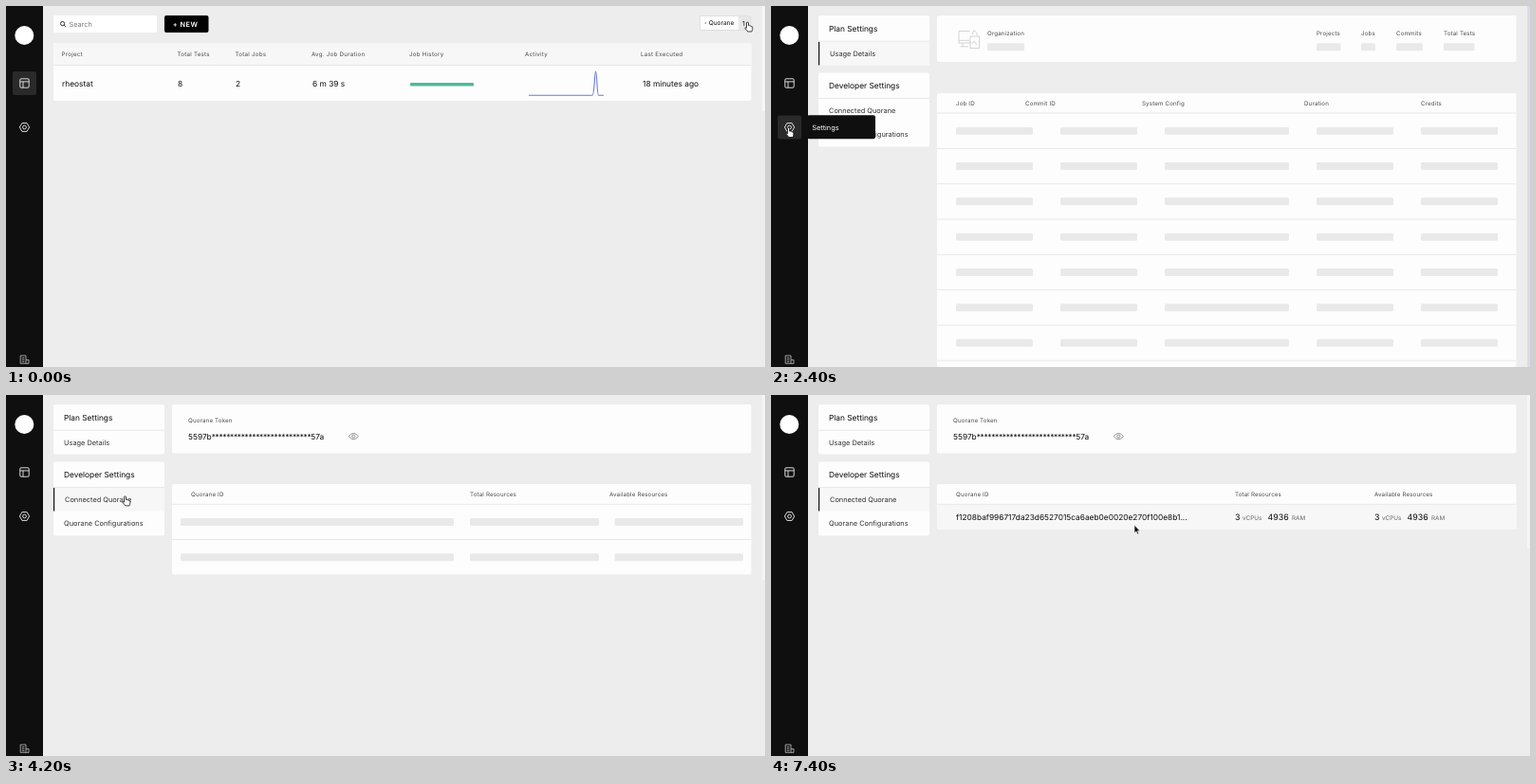
An HTML page that plays this animation: 800x381 px, repeating every 8000 ms.

```html
<!DOCTYPE html>
<html lang="en">
<head>
<meta charset="utf-8">
<title>Project dashboard</title>
<style>
html, body { margin: 0; width: 100%; height: 100%; overflow: hidden; background: #ededed; }
svg { display: block; width: 100vw; height: 100vh; }
text {
  font-family: Inter, "Liberation Sans", sans-serif; font-feature-settings: "calt" 0;
  text-rendering: geometricPrecision; white-space: pre;
}
</style>
</head>
<body>
<svg id="stage" viewBox="0 0 800 381" xmlns="http://www.w3.org/2000/svg"></svg>
<script>
const LOOP = 8000, TICK = 200;
const INK = '#0c0c0c', SOFT = '#4a4a4a', LINE = '#e8e8e8', BAR = '#e9e9e9', CARD = '#fdfdfd';
const WIDE = 610.5;

// Drawing helpers; text is placed by its vertical centre
const rect = (x, y, w, h, fill, r = 0, more = '') =>
  `<rect x="${x}" y="${y}" width="${w}" height="${h}" fill="${fill}" rx="${r}" ${more}/>`;
const path = (d, stroke, width = 1, fill = 'none') =>
  `<path d="${d}" stroke="${stroke}" stroke-width="${width}" fill="${fill}" stroke-linejoin="round"/>`;
const text = (x, cy, str, size, fill = INK, weight = 400, gap = 0) =>
  `<text x="${x}" y="${(cy + size * 0.36).toFixed(2)}" font-size="${size}" fill="${fill}" font-weight="${weight}" letter-spacing="${gap}">${str}</text>`;
const label = (x, cy, str, gap = 0.15) => text(x, cy, str, 6.2, SOFT, 400, gap);
const value = (x, cy, str) => text(x, cy, str, 8.33);
const bar = (x, cy, w, h = 8) => rect(x, cy - h / 2, w, h, BAR, 1.5);
const rule = (x, y, w) => rect(x, y - 0.5, w, 1, LINE);
const each = (list, fn) => list.map(fn).join('');
const group = (id, body) => `<g id="${id}">${body}</g>`;

function sidebar() {
  return rect(0, 0, 39, 381, '#0f0f0f') +
    '<circle cx="19.3" cy="31" r="10" fill="#fff"/>' +
    group('dashOn', rect(7, 69, 25, 25, '#2a2a2a', 2)) +
    path('M16 76.8H23Q24.2 76.8 24.2 78V85Q24.2 86.2 23 86.2H16Q14.8 86.2 14.8 85V78Q14.8 76.8 16 76.8ZM14.8 79.9H24.2M18 79.9V86.2', '#e2e2e2', 0.95) +
    group('gearOn', rect(7, 115.5, 25, 25, '#2a2a2a', 2)) +
    path('M14.4 128L16.9 123.6H22.1L24.6 128L22.1 132.4H16.9Z', '#ddd') +
    '<circle cx="19.5" cy="128" r="1.9" fill="none" stroke="#ddd"/>' +
    path('M15.2 377.3V369H21V373.6H24V377.3ZM21 373.6V377.3M16.8 371.4H19.4M16.8 373.4H19.4M16.8 375.4H19.4', '#c4c4c4', 0.8);
}

function projects() {
  const heads = [[58.5, 'Project'], [180.5, 'Total Tests'], [241.5, 'Total Jobs'],
    [322, 'Avg. Job Duration'], [425, 'Job History'], [547, 'Activity'], [669, 'Last Executed']];
  const cells = [[59, 'rheostat'], [181, '8'], [242, '2'], [323, '6 m 39 s'], [671, '18 minutes ago']];
  return rect(797, 0, 3, 111, '#f6f6f6') +
    rect(50, 10, 109, 18, '#fff', 2) +
    '<circle cx="59.6" cy="18.6" r="2.1" fill="none" stroke="#222" stroke-width=".9"/>' +
    path('M61.2 20.2L62.8 21.8', '#222') + text(66.5, 19, 'Search', 7.3, '#777') +
    rect(167, 10, 46.5, 18, '#000', 2) + text(175.8, 19, '+ NEW', 7.3, '#fff', 600, 0.5) +
    rect(731.5, 10.5, 53.5, 15, '#e8e8e8', 1.5, 'stroke="#dcdcdc" stroke-width=".7"') +
    rect(732, 11, 40, 14, '#fff', 1) +
    '<circle cx="737.3" cy="18" r=".8" fill="#777"/>' +
    text(740.8, 18, 'Quorane', 6.5) + text(776, 18, '1', 7) +
    rect(50, 39, 735.5, 61, CARD, 2) + rect(50, 39, 735.5, 24, '#f7f7f7', 2) + rule(50, 62.5, 735.5) +
    each(heads, ([x, s]) => label(x, 50.5, s, 0.25)) +
    each(cells, ([x, s]) => value(x, 81.5, s)) +
    rect(426, 81, 67, 3.6, '#52b89b', 1.2) +
    path('M551 94.3H618C620.3 94.3 620.3 69 621.6 69S622.8 94.3 624.6 94.3H630', '#6c78dc', 1.1);
}

function menu(active) {
  const items = [[50, 37.5, 'Usage Details'], [110.7, 97.5, 'Connected Quorane'], [135.7, 123, 'Quorane Configurations']];
  return rect(50, 10, 117, 52.5, CARD, 2) + rect(50, 70.5, 117, 78, CARD, 2) +
    text(61, 23.5, 'Plan Settings', 8.33) + text(61, 84.3, 'Developer Settings', 8.33) +
    each(items, ([cy, top, s], i) => {
      const on = i === active;
      return (on ? rect(50, top, 117, 25, '#f7f7f7') + rect(50, top, 1.2, 25, '#111') : '') +
        text(on ? 62 : 61, cy, s, 7.4, '#333');
    }) + rule(50, 37.2, 117) + rule(50, 97.5, 117);
}

const STATS = [[575, 'Projects', 25.5, '1'], [622, 'Jobs', 15, '2'], [659, 'Commits', 28, '1'], [709, 'Total Tests', 32.5, '8']];
const USAGE = ['Job ID', 'Commit ID', 'System Config', 'Duration', 'Credits'];
const usageHead = (xs, cy) => each(xs, (x, i) => label(x, cy, USAGE[i]));

function orgCard(h) {
  return rect(175, 10, WIDE, h, CARD, 2) +
    path('M209.5 26.5H198V39H211M198 36.3H209M202 39V42.5M199.5 42.8H208M210 44.5V32H219.5V44.5ZM212 30L214 25.5L217 28.5V31M212 40L214 37L217 41', '#cfcfcf', 0.9) +
    label(228, 28.7, 'Organization') + each(STATS, ([x, s]) => label(x, 28.7, s));
}

function usageLoading() {
  const bars = [[195, 81], [305, 81], [415, 131], [575, 81], [685, 81]];
  return menu(0) + orgCard(49) + bar(228, 43.3, 39) + each(STATS, ([x, , w]) => bar(x, 43.3, w)) +
    rect(175, 92, WIDE, 289, CARD, 2) + usageHead([195, 268, 391, 562, 685], 102.5) + rule(175, 113, WIDE) +
    each([...Array(7).keys()], i => {
      const cy = 131.8 + i * 37.28;
      return each(bars, ([x, w]) => bar(x, cy, w)) + rule(175, cy + 18.7, WIDE);
    }) + rect(797.2, 0, 2.8, 381, '#dadaea');
}

function usage() {
  const rows = [[130.5, '#de309', 'POST', 225.5, 21, '3 m 6 s', '20'], [155.5, '#981d2', 'FTM', 225, 17, '4 m 48 s', '25']];
  return menu(0) + orgCard(51.5) + value(228, 43.7, 'kirel-donvi') +
    each(STATS, ([x, , , n]) => value(x, 43.7, n)) +
    rect(656, 70, 129, 18, '#fff', 2, 'stroke="#e2e2e2" stroke-width=".6"') +
    text(662, 79, 'Showing usage for -', 7.2, '#333') + text(734, 79, 'Last 4 weeks', 7.2) +
    rect(175, 96, WIDE, 72, CARD, 2) + usageHead([195, 305, 415, 575, 685], 107) +
    rule(175, 118, WIDE) + rule(175, 142.8, WIDE) +
    each(rows, ([cy, job, tag, x, w, time, credits]) =>
      text(195, cy, job, 7.9) + rect(x, cy - 4.2, w, 8.6, '#e6e6e6', 1.5) +
      text(x + 2.6, cy, tag, 5.4, '#666', 400, 0.2) +
      `<ellipse cx="311" cy="${cy - 0.3}" rx="4" ry="2.9" fill="none" stroke="#ecb555"/>` +
      path(`M305.3 ${cy - 0.3}H307M315 ${cy - 0.3}H316.7`, '#ecb555') +
      text(320.3, cy, '#b3b49', 7.9) + text(415, cy, 'Small', 7.6) +
      text(436, cy, '(2 vCPUs 4Gi RAM)', 6.5, SOFT) + value(577, cy, time) + value(687, cy, credits));
}

function tokenPage(loading) {
  const heads = [[195, 'Quorane ID'], [489, 'Total Resources'], [636, 'Available Resources']];
  const bars = [[184, 288], [489, 136], [641.5, 135.5]];
  const stars = `<tspan letter-spacing="-.3">${'*'.repeat(27)}</tspan>`;
  const body = loading
    ? each([134, 171.2], cy => each(bars, ([x, w]) => bar(x, cy, w))) + rule(175, 152.5, WIDE)
    : rect(175, 115.5, WIDE, 26.5, '#f7f7f7') +
      value(195, 129.2, 'f1208baf996717da23d6527015ca6aeb0e0020e270f100e8b1...') +
      each([489, 636], x => text(x, 129.2, '3', 8.9) + text(x + 8, 129.8, 'vCPUs', 6.4, '#666') +
        text(x + 34.5, 129.2, '4936', 8.9) + text(x + 60, 129.8, 'RAM', 6.3, '#666'));
  return menu(1) + rect(175, 10, WIDE, 51.5, CARD, 2) + label(192, 26.3, 'Quorane Token') +
    value(192, 43.7, `5597b${stars}57a`) +
    path('M361.2 43.6Q366.3 37.2 371.4 43.6Q366.3 50 361.2 43.6Z', '#777', 0.8) +
    '<circle cx="366.3" cy="43.6" r="1.6" fill="none" stroke="#777" stroke-width=".8"/>' +
    rect(175, 94, WIDE, loading ? 95.5 : 48, CARD, 2) + each(heads, ([x, s]) => label(x, 104.6, s)) +
    body + rule(175, 115.3, WIDE) + rect(797, 0, 3, loading ? 195 : 162, '#f5f5f5');
}

const stage = document.getElementById('stage');
stage.innerHTML = rect(0, 0, 800, 381, '#ededed') + sidebar() +
  group('projects', projects()) + group('usageLoading', usageLoading()) + group('usage', usage()) +
  group('tokenLoading', tokenPage(true)) + group('token', tokenPage(false)) +
  group('copy', path('M440.4 127.5H443.2V131.7H439.6V128.4ZM441 127.4V126H444.4V130.4H443.3', '#888', 0.7)) +
  group('tip', rect(38, 115.3, 72, 25, '#0f0f0f', 2) + text(43.2, 128, 'Settings', 7.4, '#fff')) +
  group('hand', path('M-1 6.2V.9Q-1 0 0 0Q1 0 1 .9V3.7Q1.9 3.1 2.6 4Q3.4 3.5 4 4.5Q5.3 4.3 5.3 5.6V7.2Q5.2 8.5 4.5 10H.3Q-.8 8.3-2.6 6.6Q-2.9 5.3-1 6.2Z', '#111', 0.8, '#fff')) +
  group('arrow', path('M0 0V8.4L1.9 6.7L3.2 9.6L4.6 9L3.3 6.1H5.9Z', '#fff', 0.6, '#111'));

// Pointer stops: time, x, y
const STOPS = [[0, 781.5, 17], [1200, 54, 136], [1400, 21, 132.5], [1800, 18.5, 128.5], [2600, 18.5, 128.5],
  [3200, 125.5, 106.7], [5000, 125.5, 107], [6000, 231, 133], [6200, 296, 139],
  [7000, 413, 147], [7400, 383, 137.3], [LOOP, 383, 137.3]];
const ease = p => p * p * (3 - 2 * p);

function pointer(t) {
  const i = STOPS.findIndex(s => s[0] > t);
  const [t0, x0, y0] = STOPS[i - 1], [t1, x1, y1] = STOPS[i];
  const p = ease((t - t0) / (t1 - t0));
  return [x0 + (x1 - x0) * p, y0 + (y1 - y0) * p];
}

// Spans during which each part is visible
const SPANS = {
  projects: [[0, 1800]], usageLoading: [[1800, 2800]], usage: [[2800, 4000]],
  tokenLoading: [[4000, 4400]], token: [[4400, LOOP]],
  dashOn: [[0, 1800]], gearOn: [[1400, 4000]], tip: [[1400, 3000]], copy: [[5400, 6200]],
  hand: [[0, 200], [1400, 2800], [3200, 5400], [5600, 6200]]
};
const parts = {};
for (const id of [...Object.keys(SPANS), 'arrow']) parts[id] = document.getElementById(id);
const show = (id, on) => { parts[id].style.display = on ? '' : 'none'; };
const inSpan = (id, t) => SPANS[id].some(([a, b]) => t >= a && t < b);

function draw(now) {
  const t = Math.floor((now % LOOP) / TICK) * TICK;
  for (const id in SPANS) show(id, inSpan(id, t));
  show('arrow', !inSpan('hand', t));
  const [x, y] = pointer(t);
  for (const id of ['hand', 'arrow']) parts[id].setAttribute('transform', `translate(${x.toFixed(2)} ${y.toFixed(2)})`);
}

const start = performance.now();
function loop() {
  draw(performance.now() - start);
  requestAnimationFrame(loop);
}
loop();
</script>
</body>
</html>
```
